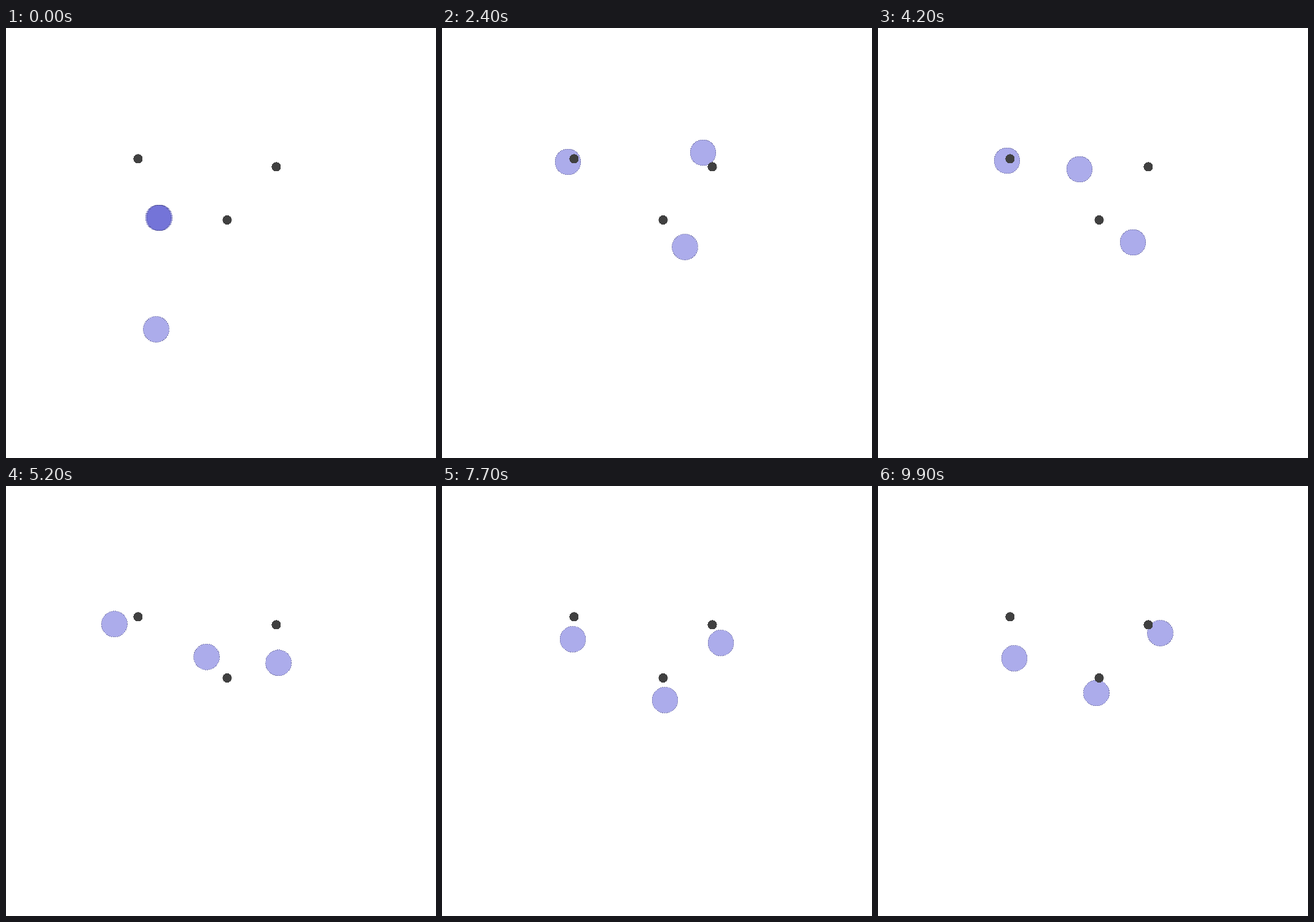
These frames come from a looping animation (700 by 700 pixels, 10 s). An HTML page:

```html
<!DOCTYPE html>
<html lang="en">
<head>
<meta charset="utf-8">
<title>Three agents, three landmarks</title>
<style>
  html, body { margin: 0; width: 100%; height: 100%; overflow: hidden; background: #fff; }
  svg { display: block; width: 100%; height: 100%; shape-rendering: crispEdges; }
  .agent { fill: #acaceb; mix-blend-mode: multiply; stroke: #8080b4; stroke-width: 1; stroke-dasharray: 2 1; }
  .landmark { fill: #404040; }
</style>
</head>
<body>
<svg id="stage" viewBox="0 0 700 700"></svg>
<script>
const STEP_MS = 100, STEPS = 100;
const CONTACT_STEPS = 13, CONTACT_FORCE = 480;
const landmarks = [[215, 213], [440, 226], [360, 312.5]];

// All agents pass a waypoint on each of these steps
const beats = [0, 13, 24, 42, 56, 61, 77, 88, 99];
const agents = [
  { push: -1, x: [248, 215, 205, 210, 166, 184.5, 213, 209, 222],
    y: [309, 217.5, 218, 216, 232, 257.5, 249.5, 262, 280.5] },
  { push: 1, x: [250, 434.5, 425, 328, 331, 342, 363, 358, 355.5],
    y: [309, 206, 203, 230, 298, 310, 348.5, 360, 337] },
  { push: 0, x: [244.5, 361.5, 395.5, 415, 453, 446, 454, 457, 459.5],
    y: [490.5, 401, 356.5, 349, 262, 246, 255.5, 217, 239.5] }
];

const stage = document.getElementById("stage");

function addCircle(className, r) {
  const circle = document.createElementNS("http://www.w3.org/2000/svg", "circle");
  circle.setAttribute("class", className);
  circle.setAttribute("r", r);
  return stage.appendChild(circle);
}

function place(circle, x, y) {
  circle.setAttribute("cx", x);
  circle.setAttribute("cy", y);
}

// Speed at a waypoint follows its neighbours; the ends are at rest
function speed(values, i) {
  if (i === 0 || i === beats.length - 1) return 0;
  return (values[i + 1] - values[i - 1]) / (beats[i + 1] - beats[i - 1]);
}

function glide(values, step) {
  let i = 0;
  while (i < beats.length - 2 && beats[i + 1] <= step) i++;
  const span = beats[i + 1] - beats[i], u = (step - beats[i]) / span, v = 1 - u;
  return v * v * (1 + 2 * u) * values[i] + u * u * (1 + 2 * v) * values[i + 1]
    + span * u * v * (v * speed(values, i) - u * speed(values, i + 1));
}

// Overlapping agents are thrown apart at once, then steer back
function contact(step) {
  const u = Math.min(1, step / CONTACT_STEPS);
  return CONTACT_FORCE * u * (1 - u) ** 2;
}

for (const agent of agents) agent.circle = addCircle("agent", 21);
for (const [x, y] of landmarks) place(addCircle("landmark", 7.6), x, y);

const start = performance.now();

function draw(now) {
  const step = Math.floor(Math.max(0, now - start) / STEP_MS) % STEPS;
  for (const { circle, push, x, y } of agents)
    place(circle, glide(x, step) + push * contact(step), glide(y, step));
  requestAnimationFrame(draw);
}
draw(start);
</script>
</body>
</html>
```
